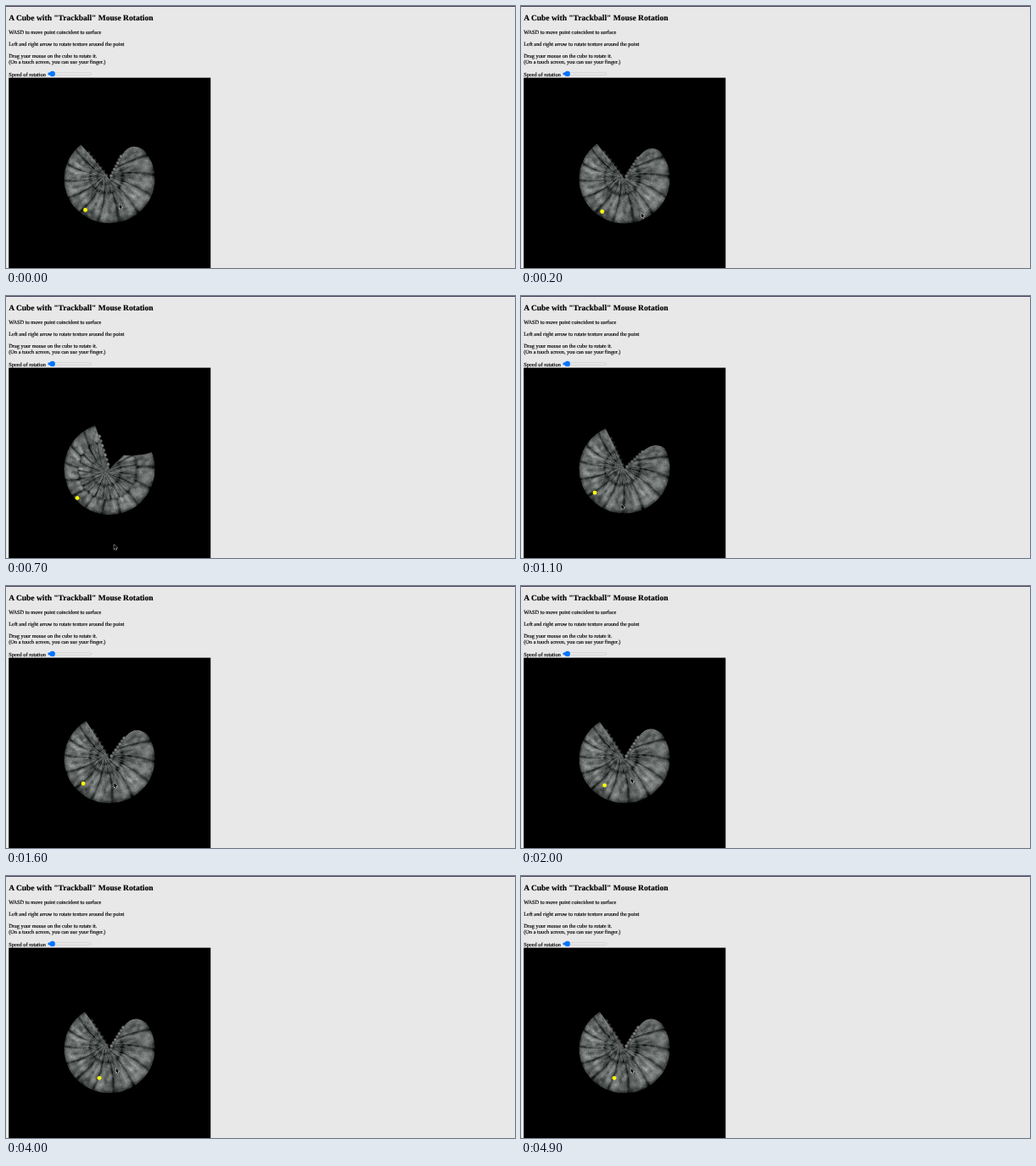
An HTML page with a canvas that plays this animation: 600x309 px, repeating every 5000 ms.

```html
<!DOCTYPE html>
<html lang="en">
<head>
<meta charset="utf-8">
<title>Trackball rotation</title>
<style>
  html, body { margin: 0; width: 100%; height: 100%; overflow: hidden; background: #e8e8e8; }
  svg, canvas { position: absolute; left: 0; top: 0; width: 600px; height: 309px; }
  text { font: 6.35px "Liberation Serif", serif; text-rendering: geometricPrecision; stroke: #000; stroke-width: .15px; }
  .title { font-size: 9.53px; font-weight: bold; }
</style>
</head>
<body>
<svg viewBox="0 0 600 309">
  <rect width="600" height=".8" fill="#24173d"/>
  <text class="title" x="3.2" y="17.3">A Cube with "Trackball" Mouse Rotation</text>
  <text x="3.2" y="33.2">WASD to move point coincident to surface</text>
  <text x="3.2" y="47">Left and right arrow to rotate texture around the point</text>
  <text x="3.2" y="60.8">Drag your mouse on the cube to rotate it.</text>
  <text x="3.2" y="68">(On a touch screen, you can use your finger.)</text>
  <text x="3.2" y="82.8">Speed of rotation</text>
  <rect x="49.6" y="78.8" width="51" height="2.4" rx="1.2" fill="#efefef" stroke="#b4b4b4" stroke-width=".5"/>
  <rect x="49.4" y="78.6" width="6" height="2.8" rx="1.4" fill="#0075ff"/>
  <circle cx="54.7" cy="79.9" r="3.2" fill="#0075ff"/>
  <rect x="3.2" y="84.6" width="238" height="225"/>
</svg>
<canvas id="view" width="600" height="309"></canvas>
<script>
const LOOP = 5000, STEP = 100;
const CX = 122, CY = 204, R = 53.5, SIZE = 110;
const X0 = CX - SIZE / 2, Y0 = CY - SIZE / 2;

// Hand input as time, x, y; the shell's pose follows from the cursor
const cursorPath = [
  [0, 133.5, 233.5], [500, 154, 260], [600, 145, 290], [700, 127.3, 293],
  [1100, 118.3, 245.5], [1600, 127.3, 232], [1800, 129.5, 226.5]
];
const dotPath = [
  [0, 93.5, 240.5], [500, 99, 245.5], [700, 84, 238.3],
  [1100, 87, 232], [1600, 91, 233], [2600, 110, 238.3]
];

const ctx = document.getElementById("view").getContext("2d");
const arrow = new Path2D("M0 0V5.6L1.3 4.4L2.2 6.5L3.1 6.1L2.2 4.1H4Z");
const skin = document.createElement("canvas");
skin.width = skin.height = SIZE;
const skinCtx = skin.getContext("2d");
const pixels = skinCtx.createImageData(SIZE, SIZE);

const mix = (a, b, k) => a + (b - a) * k;
const rad = deg => deg * Math.PI / 180;
const bump = (d, width) => Math.max(0, 1 - Math.abs(d) / width);

function follow(path, t) {
  const i = path.findIndex(point => point[0] > t);
  if (i < 0) return path[path.length - 1].slice(1);
  const a = path[i - 1], b = path[i], k = (t - a[0]) / (b[0] - a[0]);
  return [mix(a[1], b[1], k), mix(a[2], b[2], k)];
}

function hash(x, y) {
  const s = Math.sin(x * 127.1 + y * 311.7) * 43758.5453;
  return s - Math.floor(s);
}

function noise(x, y) {
  const ix = Math.floor(x), iy = Math.floor(y), fx = x - ix, fy = y - iy;
  return mix(mix(hash(ix, iy), hash(ix + 1, iy), fx),
             mix(hash(ix, iy + 1), hash(ix + 1, iy + 1), fx), fy);
}

// Fossil shell: ribs and whorls in polar form around the pole, rho = 1 at the rim
function shellLight(a, rho, whorl) {
  const rib = a * (rho > whorl ? 2.3 : 3.2) + .5 * rho;
  const cell = Math.round(rib), gap = rib - cell;
  const patch = bump(Math.abs(gap) - .3, .25) * bump(rho - .7, .3) * hash(cell, 5);
  return 40 + 50 * noise(a * 5 + 40, rho * 6) + 55 * noise(a * 14 + 90, rho * 14)
    + 70 * patch
    - 48 * bump(gap, .12) * Math.min(1, rho * 3)
    - 38 * bump(rho - whorl, .06) - 30 * bump(rho - whorl / 2, .06)
    - 30 * bump(rho - 1, .07);
}

function paintSkin(px, py, ry, whorl, spin) {
  const ox = (px - CX) / R, oy = (py - CY) / ry, room = 1 - ox * ox - oy * oy;
  for (let j = 0, p = 0; j < SIZE; j++) {
    for (let i = 0; i < SIZE; i++, p += 4) {
      const dx = (X0 + i + .5 - CX) / R - ox, dy = (Y0 + j + .5 - CY) / ry - oy;
      const d = Math.hypot(dx, dy) || .001, along = (ox * dx + oy * dy) / d;
      const rho = d / (Math.sqrt(along * along + room) - along);
      const light = shellLight(Math.atan2(dx, dy) + spin, rho, whorl) + 20 * (hash(i, j) - .5);
      pixels.data.set([light - 3, light + 1, light, 255], p);
    }
  }
  skinCtx.putImageData(pixels, 0, 0);
}

function drawTeeth([x, y], alpha) {
  ctx.globalAlpha = alpha;
  ctx.strokeStyle = "#343634";
  ctx.lineWidth = .6;
  for (let i = 1; i <= 7; i++) {
    const k = i / 7.5;
    ctx.beginPath();
    ctx.arc(mix(CX, x, k), mix(CY, y, k), 1.9, 0, 7);
    ctx.fillStyle = i % 2 ? "#858885" : "#6b6e6b";
    ctx.fill();
    ctx.stroke();
  }
  ctx.globalAlpha = 1;
}

function drawShell(t, [mx, my]) {
  // lean: 1 tipped towards the viewer, 0 face on, -1 tipped away
  const lean = Math.tanh((260 - my) / 16), front = Math.max(lean, 0), tilt = Math.abs(lean);
  const turn = -123 - .4 * (mx - 130) + .22 * (my - 227) - 6 * Math.exp(-t / 400);
  const gap = 87, ry = 54 - 2 * front;
  const at = (deg, r) => [CX + r * Math.cos(rad(deg)), CY + r * ry / R * Math.sin(rad(deg))];
  const tip = at(turn, R), left = at(turn + 3 * tilt, R / 2);
  const knee = at(turn + gap - 23 * tilt, 28 + 5 * lean);
  const bulge = at(turn + gap - 21 * front, 41 + 11 * front);

  paintSkin(CX - 6 * tilt, CY - 4 * lean, ry, .5 - .15 * lean, rad(turn + 125));
  ctx.save();
  ctx.beginPath();
  ctx.moveTo(CX, CY);
  ctx.lineTo(...knee);
  ctx.quadraticCurveTo(...bulge, ...at(turn + gap, R));
  ctx.ellipse(CX, CY, R, ry, 0, rad(turn + gap), rad(turn + 360));
  ctx.lineTo(...tip);
  ctx.quadraticCurveTo(...left, CX, CY);
  ctx.clip();
  ctx.drawImage(skin, X0, Y0);
  ctx.restore();
  drawTeeth(at(turn + 1, R * .8), tilt - front * .6);
  drawTeeth(knee, front);
}

function drawDot([x, y]) {
  ctx.beginPath();
  ctx.arc(x, y, 2.4, 0, 7);
  ctx.fillStyle = "#ffff00";
  ctx.fill();
}

function drawCursor([x, y]) {
  ctx.save();
  ctx.translate(x, y);
  ctx.strokeStyle = "#e6e6e6";
  ctx.lineWidth = 1;
  ctx.stroke(arrow);
  ctx.fillStyle = "#000";
  ctx.fill(arrow);
  ctx.restore();
}

let shown = -1;
function frame() {
  const t = Math.floor(performance.now() % LOOP / STEP) * STEP;
  if (t !== shown) {
    shown = t;
    const cursor = follow(cursorPath, t);
    ctx.clearRect(0, 0, 600, 309);
    drawShell(t, cursor);
    drawDot(follow(dotPath, t));
    drawCursor(cursor);
  }
  requestAnimationFrame(frame);
}
frame();
</script>
</body>
</html>
```
